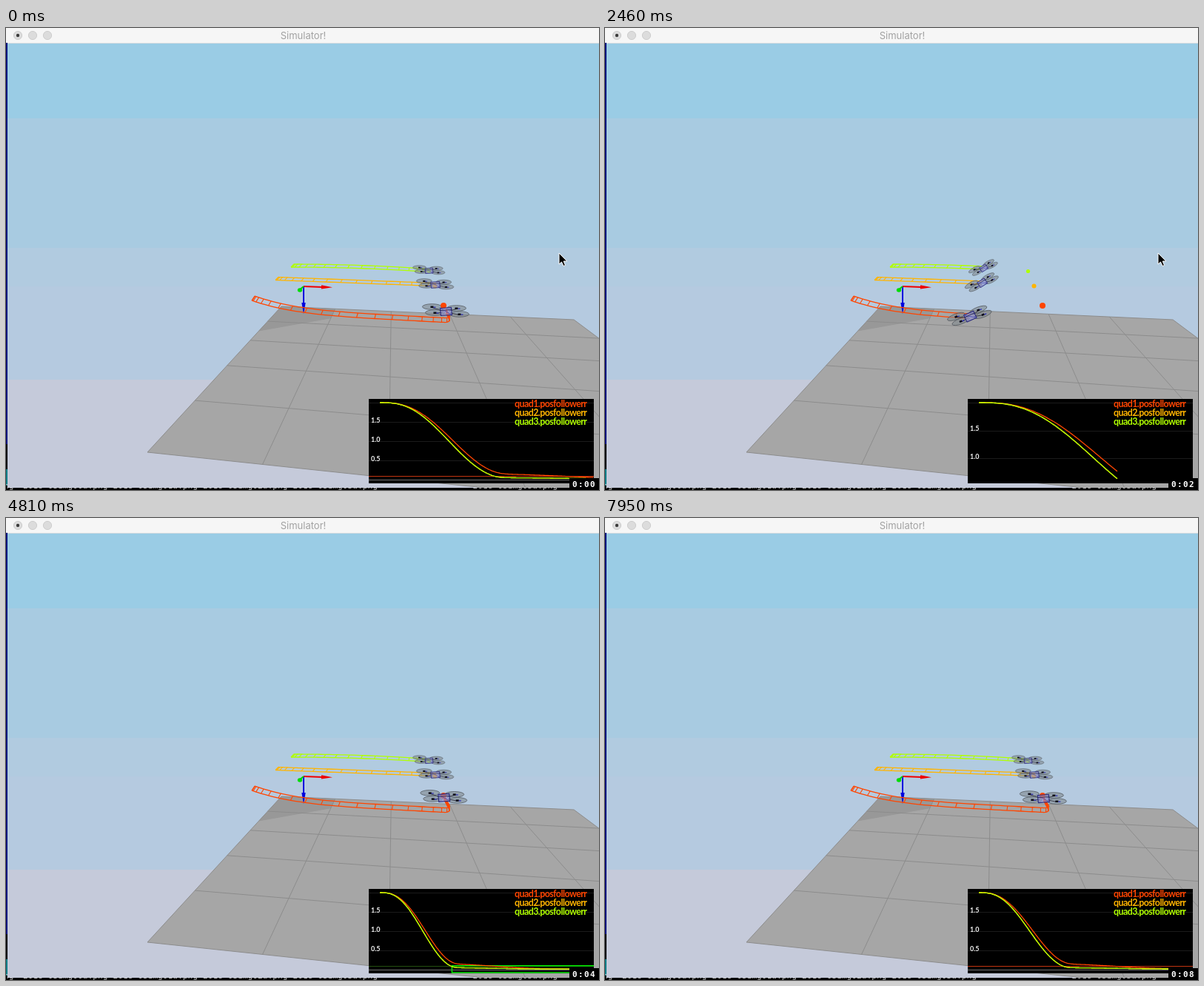
Recreate the animation shown at these times as an HTML page with a canvas. Size 801 by 624 pixels, loop 8 s.

```html
<!DOCTYPE html>
<html lang="en">
<head>
<meta charset="utf-8">
<title>Simulator</title>
<style>
html, body { margin: 0; width: 100%; height: 100%; overflow: hidden; background: #000; }
canvas { display: block; width: 801px; height: 624px; }
</style>
</head>
<body>
<canvas id="stage" width="801" height="624"></canvas>
<script>
const ctx = document.getElementById('stage').getContext('2d');
const LOOP = 8000, CYCLE = 3640, LAUNCH = 1685, WINDOW = 1175, REFRESH = 70;

// Each quad flies from x0 to x1 in T ms along the path y(f), f from 0 to 1.
const QUADS = [
  { color: '#ff4500', x0: 334, x1: 601, T: 1340, bend: .16, size: 1, half: 3,
    ball: { x: 591, y: 375, r: 4 }, drift: { x: -10, y: -19 },
    y: f => 365 + 14 * f + 16 * (1 - (1 - f) ** 5) },
  { color: '#ffb400', x0: 366, x1: 580, T: 1262, bend: .11, size: .8, half: 2,
    ball: { x: 579.5, y: 348.5, r: 3 }, drift: { x: 0, y: 0 },
    y: f => 338.5 + 8 * f },
  { color: '#b0ff00', x0: 387, x1: 571.5, T: 1262, bend: .09, size: .69, half: 2,
    ball: { x: 571.5, y: 328.5, r: 2.6 }, drift: { x: 0, y: 0 },
    y: f => 321 + 6.5 * f * f }
];

const unit = v => Math.max(0, Math.min(1, v));
const minJerk = u => u * u * u * (10 - 15 * u + 6 * u * u);
const progress = (q, tau) => minJerk(unit(tau / q.T));

function position(q, tau) {
  const s = progress(q, tau);
  const f = s / (1 + q.bend * (1 - s));
  const d = tau > 1150 ? 1 - Math.exp((1150 - tau) / 750) : 0;
  return { f, x: q.x0 + (q.x1 - q.x0) * f + q.drift.x * d, y: q.y(f) + q.drift.y * d };
}

// Lean follows the acceleration of the flight.
function tilt(q, tau) {
  const u = unit(tau / q.T);
  return Math.atan(.18 * (60 * u - 180 * u * u + 120 * u * u * u));
}

function followError(q, tau) {
  const main = 2 * (1 - progress(q, tau));
  const peak = q.size === 1 ? .13 : .035;
  const rest = .015 + peak * Math.exp(-(((tau - 1000) / 900) ** 2));
  return Math.hypot(main, tau > 400 ? rest : 0);
}

function rect(color, x, y, w, h) {
  ctx.fillStyle = color;
  ctx.fillRect(x, y, w, h);
}

function paint(fill, stroke, width = 1) {
  if (fill) {
    ctx.fillStyle = fill;
    ctx.fill();
  }
  if (stroke) {
    ctx.strokeStyle = stroke;
    ctx.lineWidth = width;
    ctx.stroke();
  }
}

function trace(points) {
  ctx.beginPath();
  points.forEach(([x, y]) => ctx.lineTo(x, y));
}

function line(points, color, width) {
  trace(points);
  paint(null, color, width);
}

function shape(points, fill, stroke, width) {
  trace(points);
  ctx.closePath();
  paint(fill, stroke, width);
}

function oval(x, y, rx, ry, fill, stroke, width) {
  ctx.beginPath();
  ctx.ellipse(x, y, rx, ry, 0, 0, 7);
  paint(fill, stroke, width);
}

function label(text, x, y, font, color, align = 'left', spacing = '0px') {
  ctx.font = font;
  ctx.fillStyle = color;
  ctx.textAlign = align;
  ctx.letterSpacing = spacing;
  ctx.fillText(text, x, y);
}

function clipTo(x, y, w, h) {
  ctx.save();
  ctx.beginPath();
  ctx.rect(x, y, w, h);
  ctx.clip();
}

function drawDesktop() {
  rect('#000', 0, 0, 801, 624);
  rect('#00117c', 0, 0, 2, 562);
  rect('#007c84', 0, 596, 2, 22);
  const font = '11.2px "DejaVu Sans Mono", monospace';
  label('ng', -3, 622, font, '#c8c8c8');
  for (let i = 0; i < 6; i++)
    if (i !== 4) label(`2018-03img0${i}a.png`, 23 + 121.5 * i, 622, font, '#c8c8c8');
}

// Perspective of the unit square: u runs right, v runs away from the viewer.
function ground(u, v) {
  const w = 1 - .218 * u + 1.2 * v;
  return [(191 + 702 * u + 627.4 * v) / w, (573 - 46.3 * u + 254.2 * v) / w];
}

function drawScene() {
  const bands = { 20: '#9acce5', 122: '#a8cbe1', 297: '#b1cbe0', 349: '#b5cae0', 475: '#c5cada' };
  for (const y in bands) rect(bands[y], 2, +y, 799, 621 - y);

  clipTo(2, 21, 799, 600);
  shape([ground(0, 0), ground(0, 1), ground(1, 1), ground(1, 0)], '#a6a6a6');
  shape([ground(0, .69), ground(0, 1), ground(.2, 1), ground(.2, .87)], '#989898');
  for (let i = 0; i <= 5; i++) {
    line([ground(i / 5, 0), ground(i / 5, 1)], '#8c8c8c');
    line([ground(0, i / 5), ground(1, i / 5)], '#8c8c8c');
  }
  ctx.restore();

  rect('#f6f6f6', 0, 0, 801, 20);
  rect('#d8dde0', 2, 20, 799, 1);
  for (let x = 16; x < 60; x += 20) oval(x, 10, 5.6, 5.6, '#dcdcdc', '#cdcdcd');
  oval(16, 10, 2.2, 2.2, '#3c3c3c');
  label('Simulator!', 401.5, 14.8, '13px Inter, sans-serif', '#a2a2a2', 'center');
}

function arrow(angle, length, color) {
  ctx.save();
  ctx.translate(402, 349);
  ctx.rotate(angle);
  line([[0, 0], [length - 13, 0]], color, 2);
  shape([[length - 15, -2.7], [length, 0], [length - 15, 2.7]], color);
  ctx.restore();
}

function drawAxes() {
  arrow(.035, 39, '#e00');
  arrow(Math.PI / 2, 37, '#00d');
  line([[402, 349], [396, 354]], '#0c0', 2);
  oval(397, 354, 3.2, 2.8, '#00dc00');
}

function drawTrail(q, tau) {
  const upper = [], lower = [];
  const sides = at => {
    const p = position(q, at), lean = 2 * (1 - p.f);
    return [[p.x + lean, p.y - q.half], [p.x - lean, p.y + q.half]];
  };
  for (let at = 0; at < tau; at += 20) {
    const [a, b] = sides(at);
    upper.push(a);
    lower.push(b);
  }
  line(upper, q.color, 1.3);
  line(lower, q.color, 1.3);
  for (let at = 0; at < tau; at += 65) line(sides(at), q.color, 1.1);
}

function pose(q, tau, drawParts) {
  const { x, y } = position(q, tau), angle = tilt(q, tau);
  ctx.save();
  ctx.translate(x, y);
  ctx.rotate(angle);
  ctx.scale(q.size * (1 - .15 * Math.abs(Math.sin(angle))), q.size);
  drawParts();
  ctx.restore();
}

function rotors() {
  for (const near of [-1, 1]) for (const side of [-1, 1]) {
    const x = -.5 + 16.5 * side + 2 * near, y = -1 + side + 4 * near;
    oval(x, y, 13, 3.8, 'rgba(128,136,142,.6)', '#565c62', .8);
    line([[x, y + 1], [x * .3, y * .3 + 1]], '#3a3a48', 1);
    rect('#0c0c18', x - 2, y - 1, 4, 2.5);
    rect('#2828b4', x + 2, y, 3, 1.2);
  }
}

function body() {
  shape([[-8, -4], [7, -5], [8, 5], [-7, 6]], 'rgba(145,145,205,.65)', '#28287c', 1.1);
  line([[-8, -4], [8, 5]], '#4a4ab4', .8);
  line([[-8, -1], [8, -2]], '#20204c', .8);
}

function drawQuad(q, tau) {
  const { x, y, r } = q.ball;
  drawTrail(q, tau);
  pose(q, tau, rotors);
  oval(x, y, r, r, q.color);
  pose(q, tau, body);
}

function drawPlot(tau) {
  const lo = Math.min(1.98, 2 * (1 - progress(QUADS[1], tau)));
  const X = at => 505 + at * 289 / Math.max(tau, WINDOW);
  const Y = v => 610 - 104 * (v - lo) / (2 - lo);
  const level = (v, color) => line([[490, Math.round(Y(v)) + .5], [794, Math.round(Y(v)) + .5]], color);
  const settled = tau > 2780;

  clipTo(490, 501, 304, 114);
  rect('#000', 490, 501, 304, 114);
  const span = 2 - lo, tick = span > .8 ? .5 : span > .3 ? .2 : .1;
  for (let v = 2; v > lo && v > .01; v -= tick) {
    level(v, '#1b1b1b');
    if (v < 2) label(v.toFixed(1), 493, Y(v) + .5, 'bold 9px Lato, sans-serif', '#f4f4f4');
  }
  if (lo < .1) {
    level(0, '#707070');
    level(.1, settled ? '#245010' : '#c23410');
    if (settled) {
      const x = X(1060), y = Y(.1);
      line([[794, y], [x, y], [x, 614], [794, 614]], '#00f000', 1.5);
    }
  }
  QUADS.forEach((q, i) => {
    const points = [];
    for (let at = 0; at < tau; at += 10) points.push([X(at), Y(followError(q, at))]);
    line(points, q.color, 1.3);
    label(`quad${i + 1}.posfollowerr`, 687, 512 + 12 * i,
      'bold 12.4px Lato, sans-serif', q.color, 'left', '-0.55px');
  });
  ctx.restore();
}

// The pointer rests, then drops off the lower edge with growing speed.
function drawCursor(t) {
  const y = 304 + 8 * (Math.max(0, t - 3360) / 70) ** 2;
  if (y > 640) return;
  const outline = [[0, 0], [0, 15], [3.5, 12], [6, 17.5], [8.5, 16.4], [6.2, 11], [10.8, 11]];
  shape(outline.map(([dx, dy]) => [747 + dx, y + dy]), '#000', '#fff');
}

function drawClock(t) {
  rect('#000', 761, 608, 40, 16);
  label('0:0' + Math.floor((t + 100) / 1000), 765, 619.5,
    'bold 11px "DejaVu Sans Mono", monospace', '#fff', 'left', '1.4px');
}

function draw(t) {
  const tau = (t - LAUNCH + CYCLE) % CYCLE;
  drawDesktop();
  drawScene();
  drawAxes();
  [...QUADS].reverse().forEach(q => drawQuad(q, tau));
  drawPlot(tau);
  drawCursor(t);
  drawClock(t);
}

const start = performance.now();
function tick() {
  const t = (performance.now() - start) % LOOP;
  draw(Math.round(t / REFRESH) * REFRESH);
  requestAnimationFrame(tick);
}
tick();
</script>
</body>
</html>
```
